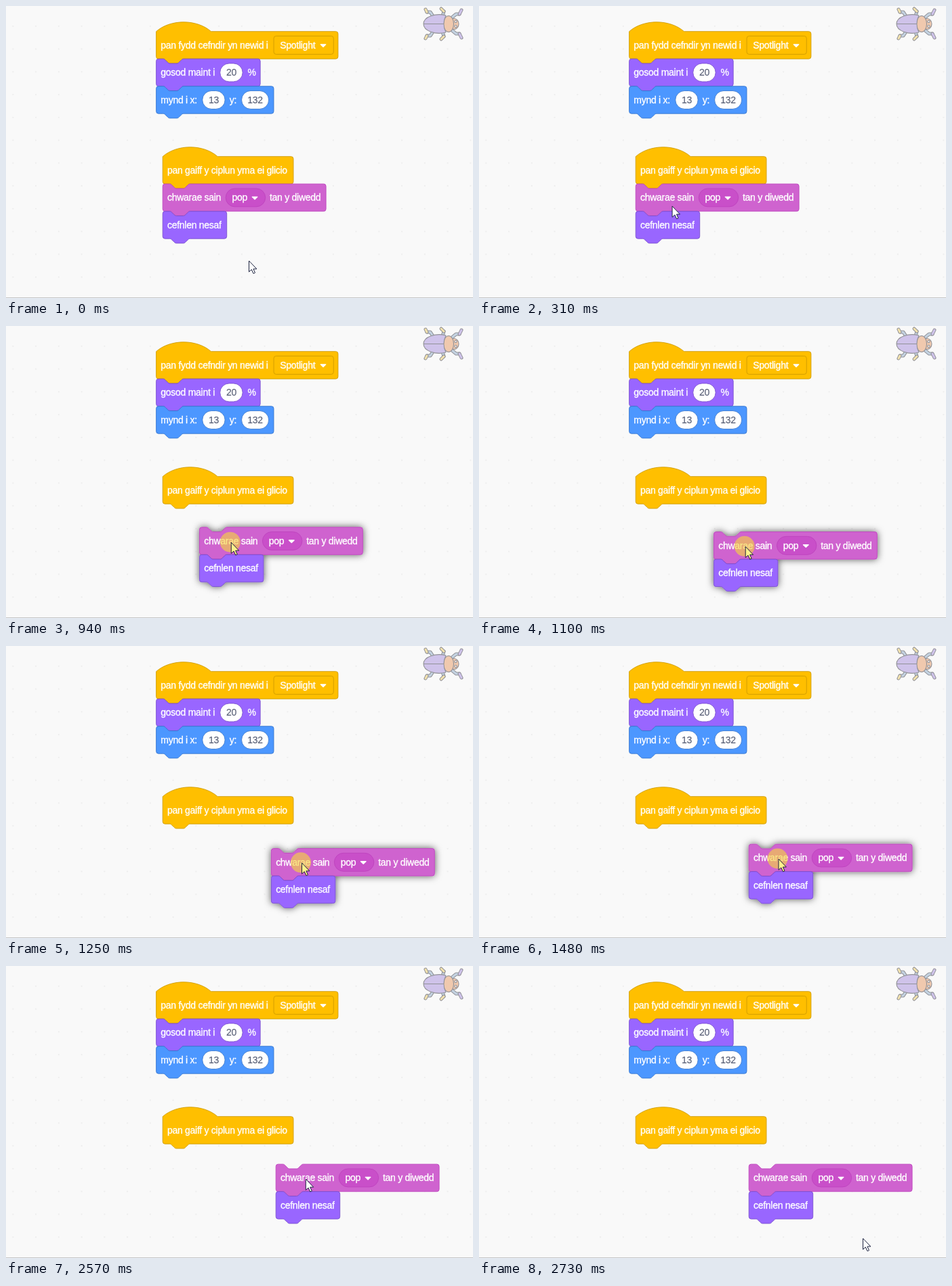
An HTML page for the animation above (2820 ms loop, 689x432 px).

```html
<!DOCTYPE html>
<html lang="cy">
<head>
<meta charset="utf-8">
<title>Blociau</title>
<style>
  html, body { margin: 0; width: 100%; height: 100%; overflow: hidden; background: #f9f9f9; }
  svg { display: block; width: 100vw; height: 100vh; }
  text {
    font: 500 16.6px "Liberation Sans", Arial, sans-serif; letter-spacing: -.33px;
    fill: #fff; stroke: #fff; stroke-width: .4;
  }
  .num { fill: #575e75; stroke: #575e75; stroke-width: .15; text-anchor: middle; }
</style>
</head>
<body>
<svg viewBox="0 0 689 432">
  <defs>
    <pattern id="grid" x="-6.5" y="13" width="33.75" height="33.75" patternUnits="userSpaceOnUse">
      <rect x="16" y="16" width="1.6" height="1.6" fill="#e8e8e8"/>
    </pattern>
    <filter id="shadow" x="-20%" y="-30%" width="140%" height="160%">
      <feDropShadow dx="0" dy="0" stdDeviation="6" flood-color="#000" flood-opacity=".65"/>
    </filter>
  </defs>
  <rect width="689" height="432" fill="#f9f9f9"/>
  <rect width="689" height="432" fill="url(#grid)"/>
  <rect y="431" width="689" height="1" fill="#c6c6c6"/>

  <g id="beetle" stroke="#929298" stroke-width="1.1" stroke-linejoin="round" stroke-linecap="round"></g>
  <g id="fixed"></g>
  <g id="moving"></g>
  <circle id="press" r="15" fill="#f5d73c" fill-opacity=".62"/>
  <path id="cursor" d="M0 0V16.3L3.8 12.9L6.5 18.8L9 17.7L6.4 12H11.4Z" stroke="#1d2340" stroke-linejoin="round"/>
</svg>
<script>
const $ = id => document.getElementById(id);
const SCALE = 0.84375, ROW = 48;

const EVENT = ['#ffbf00', '#cc9900'];
const LOOKS = ['#9966ff', '#774dcb'];
const MOTION = ['#4c97ff', '#3373cc'];
const SOUND = ['#cf63cf', '#bd42bd'];

// Block outlines, in unscaled block units
const NOTCH = 'H12c2 0 3 1 4 2l4 4c1 1 2 2 4 2h12c2 0 3-1 4-2l4-4c1-1 2-2 4-2';
const BUMP = 'H48c-2 0-3 1-4 2l-4 4c-1 1-2 2-4 2h-12c-2 0-3-1-4-2l-4-4c-1-1-2-2-4-2';
const HAT = 'M0 0c25-22 71-22 96 0';
const STACK = 'M0 4A4 4 0 0 1 4 0' + NOTCH;

const block = (row, top, w, [fill, stroke], inner) =>
  `<g transform="translate(0 ${row * ROW})">
    <path d="${top}H${w - 4}a4 4 0 0 1 4 4v40a4 4 0 0 1-4 4${BUMP}H4a4 4 0 0 1-4-4z" fill="${fill}" stroke="${stroke}"/>
    ${inner}</g>`;
const label = (x, s) => `<text x="${x}" y="29.8">${s}</text>`;
const box = (x, w, r, fill, stroke) =>
  `<rect x="${x}" y="8" width="${w}" height="32" rx="${r}" fill="${fill}" stroke="${stroke}"/>`;
const number = (x, w, s, stroke) =>
  box(x, w, 16, '#fff', stroke) + `<text class="num" x="${x + w / 2}" y="29.8">${s}</text>`;
const caret = x =>
  `<path d="M${x - 4.5} 22.7h9l-4.5 4.3z" fill="#fff" stroke="#fff" stroke-width="1.6" stroke-linejoin="round"/>`;
const place = (x, y) => `translate(${x} ${y}) scale(${SCALE})`;
const group = (x, y, s) => `<g transform="${place(x, y)}">${s}</g>`;

$('fixed').innerHTML =
  group(221.6, 37.7,
    block(0, HAT, 318, EVENT, label(8, 'pan fydd cefndir yn newid i') +
      box(205.6, 104.5, 4, ...EVENT) + label(216.5, 'Spotlight') + caret(292)) +
    block(1, STACK, 182, LOOKS, label(8, 'gosod maint i') +
      number(111.6, 39.5, '20', LOOKS[1]) + label(160, '%')) +
    block(2, STACK, 205.5, MOTION, label(8, 'mynd i x:') +
      number(80.8, 39.5, '13', MOTION[1]) + label(128.3, 'y:') +
      number(149.3, 47.5, '132', MOTION[1]))) +
  group(231.2, 222.7,
    block(0, HAT, 228.5, EVENT, label(8, 'pan gaiff y ciplun yma ei glicio')));

$('moving').innerHTML =
  block(0, STACK, 285.5, SOUND, label(8, 'chwarae sain') +
    box(110.2, 69.3, 16, '#c94fc9', SOUND[1]) + label(121.3, 'pop') + caret(161) +
    label(187, 'tan y diwedd')) +
  block(1, STACK, 112, LOOKS, label(8, 'cefnlen nesaf'));

// Beetle: one side of legs, mirrored, under the body
const BLUE = '#c4d3e2', GOLD = '#f2e2ae', LILAC = '#cfc3ea', PEACH = '#f0c9ae';
const limb = (d, c) =>
  `<path d="${d}" fill="none" stroke-width="5"/><path d="${d}" fill="none" stroke="${c}" stroke-width="3"/>`;
const oval = (x, y, rx, ry, c) => `<ellipse cx="${x}" cy="${y}" rx="${rx}" ry="${ry}" fill="${c}"/>`;
const legs =
  limb('M630 15L626 9L621 9', BLUE) + limb('M621 9L619 5', GOLD) +
  limb('M644 15L646 8', BLUE) + limb('M646 8L642 4', GOLD) +
  limb('M658 17L664 12L669 12', BLUE) + limb('M669 12L672 6', LILAC);
$('beetle').innerHTML =
  legs + `<g transform="matrix(1 0 0 -1 0 53)">${legs}</g>` +
  oval(661, 26.5, 7, 8, PEACH) + oval(653, 26.5, 7.5, 12, PEACH) +
  `<path d="M649 14C634 10 616 16 616 26.5C616 37 634 43 649 39C645 31 645 22 649 14ZM616 26.5H646" fill="${LILAC}"/>` +
  oval(663.5, 23, 1.5, 1.7, '#fff') + oval(663.5, 30, 1.5, 1.7, '#fff');

const LOOP = 2820, STEPS = 36, STEP = LOOP / STEPS, LEAD = 12;
const LIFT = 780, DROP = 1955, TRAIL = 8;

const progress = (t, from, to) => Math.min(1, Math.max(0, (t - from) / (to - from)));
const ease = p => p * p * (3 - 2 * p);

// Drag offset: eased to the right, dipping on the way
function drag(t) {
  const p = progress(t, 692, 1322), e = ease(p);
  return [167 * e, 30 * e + 25 * Math.sin(Math.PI * p ** 0.8)];
}

function draw(clock) {
  const t = Math.floor((clock + LEAD) / STEP) % STEPS * STEP;
  const down = t > 700 && t < DROP, lifted = t > LIFT && t < DROP;
  const reach = ease(progress(t, 0, 400)), leave = ease(progress(t, 2500, 2740));
  const [px, py] = t > LIFT ? drag(t) : [0, 0];
  const [bx, by] = t > LIFT ? drag(t - TRAIL) : [0, 0];
  const x = 358 - 83.5 * reach + px + 124.5 * leave;
  const y = 376 - 92 * reach + py + 88 * leave;

  $('moving').setAttribute('transform', place(231.2 + bx, 263.2 + by));
  $('moving').setAttribute('filter', lifted ? 'url(#shadow)' : 'none');
  $('press').setAttribute('transform', `translate(${x - 1} ${y + 0.5})`);
  $('press').setAttribute('visibility', down ? 'visible' : 'hidden');
  $('cursor').setAttribute('transform', `translate(${x + 0.5} ${y + 1})`);
  $('cursor').setAttribute('fill', down ? '#fff28c' : '#fff');
}

const start = performance.now();
function tick() {
  draw((performance.now() - start) % LOOP);
  requestAnimationFrame(tick);
}
tick();
</script>
</body>
</html>
```
